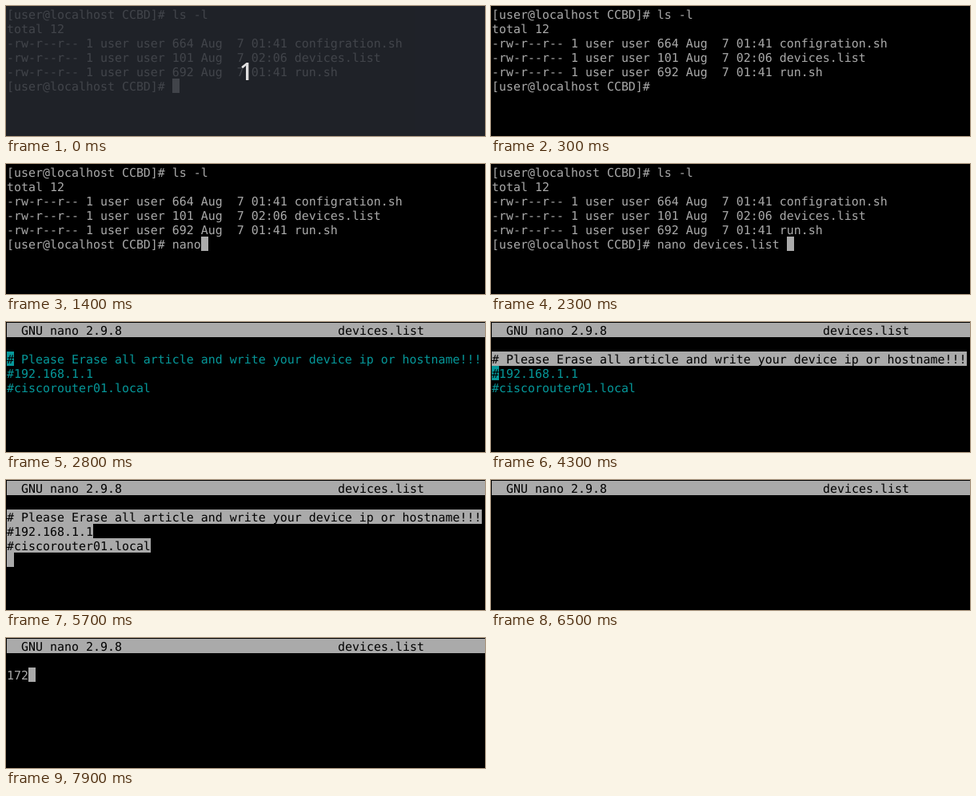
Animation, 599 px wide and 163 px high, one loop 8 s. Source, as an HTML page:

```html
<!DOCTYPE html>
<html lang="en">
<head>
<meta charset="utf-8">
<title>Terminal session</title>
<style>
  html, body { margin: 0; width: 100%; height: 100%; overflow: hidden; background: #000; }
  svg { display: block; width: 100%; height: 100%; }
  #screen text {
    font: 14.95px "DejaVu Sans Mono", "Noto Sans Mono", monospace;
    text-rendering: geometricPrecision;
    white-space: pre;
  }
  #count text {
    font: 600 30px "Open Sans", "Noto Sans", sans-serif;
    fill: #dedede; stroke: #16181d; stroke-width: 1; paint-order: stroke;
  }
</style>
</head>
<body>
<svg viewBox="0 0 599 163" preserveAspectRatio="xMinYMin meet">
  <rect width="599" height="163" fill="#000"/>
  <g id="screen"></g>
  <g id="count">
    <rect width="599" height="163" fill="#272b33" fill-opacity=".8"/>
    <text x="292" y="92.5">1</text>
  </g>
</svg>
<script>
const LOOP = 8000, CELL_W = 9, CELL_H = 18, EDGE = 1, BASELINE = 15;
const GREY = "#aaaaaa", TEAL = "#06989a", BLACK = "#000";
const screen = document.getElementById("screen");
const count = document.getElementById("count");

const PROMPT = "[user@localhost CCBD]# ";
const LISTING = [
  PROMPT + "ls -l",
  "total 12",
  "-rw-r--r-- 1 user user 664 Aug  7 01:41 configration.sh",
  "-rw-r--r-- 1 user user 101 Aug  7 02:06 devices.list",
  "-rw-r--r-- 1 user user 692 Aug  7 01:41 run.sh"
];
const NOTES = [
  "# Please Erase all article and write your device ip or hostname!!!",
  "#192.168.1.1",
  "#ciscorouter01.local"
];
const COMMAND = "nano devices.list ";
const ADDRESS = "172";

// [time, value] steps; the latest one reached applies
const COMMAND_KEYS = [[0, 0], [600, 1], [900, 2], [1200, 3], [1400, 4], [1700, 6], [2000, 8], [2300, 18]];
const SELECTED = [[2800, 0], [4300, 1], [4500, 2], [5000, 3]];
const ADDRESS_KEYS = [[6300, 0], [7200, 1], [7500, 2], [7900, 3]];
const CURSOR_OFF = [[300, 600], [3300, 4000], [5400, 5700], [6500, 7200]];

const stepAt = (steps, t) => steps.filter(s => s[0] <= t).pop()[1];

function add(tag, attrs, content = "") {
  const el = document.createElementNS("http://www.w3.org/2000/svg", tag);
  for (const key in attrs) el.setAttribute(key, attrs[key]);
  el.textContent = content;
  screen.append(el);
}

function block(col, row, cells, fill) {
  add("rect", { x: EDGE + col * CELL_W, y: EDGE + row * CELL_H, width: cells * CELL_W, height: CELL_H, fill });
}

function write(col, row, text, fill = GREY) {
  add("text", { x: EDGE + col * CELL_W, y: EDGE + row * CELL_H + BASELINE, fill }, text);
}

function drawShell(t, cursorOn) {
  LISTING.forEach((line, row) => write(0, row, line));
  const line = PROMPT + COMMAND.slice(0, stepAt(COMMAND_KEYS, t));
  write(0, 5, line);
  if (cursorOn) block(line.length, 5, 1, GREY);
}

function drawNotes(t, cursorOn) {
  const selected = stepAt(SELECTED, t);
  NOTES.forEach((line, i) => {
    const marked = i < selected;
    if (marked) block(0, i + 2, line.length, GREY);
    write(0, i + 2, line, marked ? BLACK : TEAL);
  });
  if (!cursorOn) return;
  const under = NOTES[selected];
  block(0, selected + 2, 1, under ? TEAL : GREY);
  if (under) write(0, selected + 2, under[0], BLACK);
}

function drawAddress(t, cursorOn) {
  const typed = ADDRESS.slice(0, stepAt(ADDRESS_KEYS, t));
  write(0, 2, typed);
  if (cursorOn) block(typed.length, 2, 1, GREY);
}

function drawEditor(t, cursorOn) {
  add("rect", { x: EDGE, y: EDGE, width: 598, height: CELL_H, fill: GREY });
  write(2, 0, "GNU nano 2.9.8", BLACK);
  write(46, 0, "devices.list", BLACK);
  (t < 6300 ? drawNotes : drawAddress)(t, cursorOn);
}

function render(t) {
  const cursorOn = !CURSOR_OFF.some(([from, to]) => t >= from && t < to);
  screen.replaceChildren();
  (t < 2800 ? drawShell : drawEditor)(t, cursorOn);
  count.style.display = t < 300 ? "" : "none";
}

const start = performance.now();
function tick() {
  render((performance.now() - start) % LOOP);
  requestAnimationFrame(tick);
}
tick();
</script>
</body>
</html>
```
